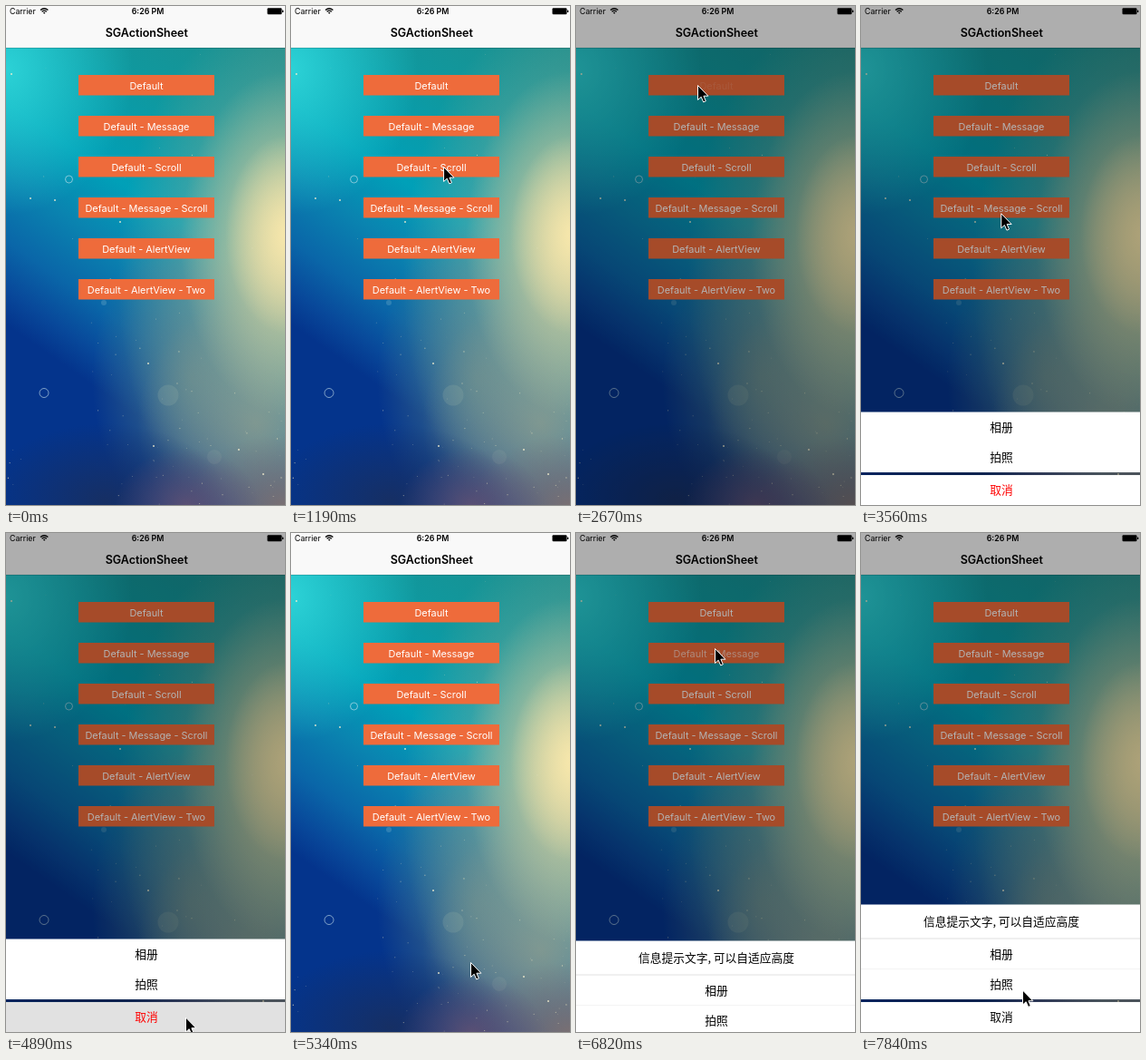
An HTML page for the animation above (7990 ms loop, 308 px wide and 550 px high).

```html
<!DOCTYPE html>
<html lang="zh-CN">
<head>
<meta charset="utf-8">
<style>
html, body { margin: 0; width: 100%; height: 100%; overflow: hidden; }
svg { display: block; }
text { font-family: Inter, "Noto Sans CJK SC", "Noto Sans CJK", sans-serif; text-anchor: middle; }
.bar { font-size: 8.8px; }
.title { font-size: 12.5px; font-weight: 600; }
.label { font-size: 10.9px; fill: #fff; }
.row { font: 12.75px "Noto Sans CJK SC", "Noto Sans CJK", sans-serif; }
</style>
</head>
<body>
<svg id="stage" width="308" height="550" viewBox="0 0 308 550">
  <g id="sky"></g>
  <path d="M0 0H308V46H0Z" fill="#f9f9f9"/>
  <path d="M0 46.3H308" stroke="#000" stroke-opacity=".3" stroke-width=".6"/>
  <text class="bar" x="4" y="9" style="text-anchor:start">Carrier</text>
  <g fill="none" stroke="#000" stroke-width="1.3">
    <path d="M38 4.6Q42.2 .9 46.4 4.6M39.6 6.3Q42.2 4 44.8 6.3"/>
    <path d="M40.9 7.3Q42.2 6.3 43.5 7.3L42.2 8.8Z" fill="#000" stroke="none"/>
  </g>
  <text class="bar" x="156.5" y="9.2" font-weight="600">6:26 PM</text>
  <rect x="288.5" y="2.3" width="16" height="7" rx="1.2"/>
  <rect x="305" y="4.5" width="1.3" height="2.6" rx=".5"/>
  <text class="title" x="155.3" y="34.2">SGActionSheet</text>
  <g id="buttons"></g>
  <path id="dim" d="M0 0H308V550H0Z" opacity="0"/>
  <g id="plain"></g>
  <g id="message"></g>
  <path id="cursor" d="M0 0V16L3.7 12.7L6.2 18.4L8.8 17.3L6.4 11.7H11.4Z" stroke="#fff" stroke-linejoin="round"/>
</svg>
<script>
const $ = id => document.getElementById(id);
const LOOP = 7990;

// Background: soft colour pools, [x, y, rx, ry, colour], topmost first
const pools = [
  [312, 252, 70, 110, '#f8e8ac'], [308, 262, 115, 190, '#d2cf9f'],
  [200, 552, 80, 65, '#5b5074'], [308, 552, 110, 80, '#7b7072'],
  [110, 545, 135, 85, '#162f64'], [308, 300, 185, 300, '#8fae9a'],
  [275, 460, 130, 140, '#72868a'], [205, 410, 110, 170, '#47788c'],
  [0, 70, 140, 160, '#2cd2d6']
];
$('stage').style.background = pools
  .map(([x, y, rx, ry, c]) => `radial-gradient(${rx}px ${ry}px at ${x}px ${y}px, ${c}, ${c}00)`)
  .concat('linear-gradient(215deg, #1f8c88, #10989e 25%, #00a0b8 42%, #0a84b0 52%, ' +
    '#0a66a8 62%, #08489a 69%, #04348c 74%)').join();

let seed = 7;
const random = () => (seed = seed * 16807 % 2147483647) / 2147483647;
const dot = (x, y, r, fill, opacity) =>
  `<circle cx="${x}" cy="${y}" r="${r}" fill="${fill}" opacity="${opacity}"/>`;
const bubble = (x, y, r) =>
  `<circle cx="${x}" cy="${y}" r="${r}" fill="none" stroke="#cfe6ee" stroke-opacity=".6"/>`;

let sky = '';
for (let i = 0; i < 90; i++) {
  const y = 50 + 500 * Math.sqrt(random());
  const x = (random() * 220 + y * .22) % 308;
  sky += dot(x, y, .3 + random() * .4, '#e8e4c0', .25 + random() * .5);
}
for (const [x, y] of [[6, 75], [130, 90], [27, 212], [54, 214], [126, 238], [257, 489], [284, 516], [163, 485], [157, 394]])
  sky += dot(x, y, 1, '#f4efd0', .85);
sky += dot(179, 429, 11.5, '#a0b8a8', .2) + dot(230, 497, 8, '#b0b8b0', .12) + dot(108, 327, 3, '#9cc8d8', .25);
sky += bubble(42, 426.5, 5) + bubble(69.5, 191, 4);
$('sky').innerHTML = sky;

const labels = ['Default', 'Default - Message', 'Default - Scroll',
  'Default - Message - Scroll', 'Default - AlertView', 'Default - AlertView - Two'];
$('buttons').innerHTML = labels.map((label, i) => {
  const y = 76 + i * 45;
  return `<rect x="80" y="${y}" width="150" height="22.5" fill="#ee6b3b"/>
    <text class="label" x="155" y="${y + 15.5}">${label}</text>`;
}).join('');
const captions = document.querySelectorAll('.label');

const row = (y, text, fill = '#000') => `<text class="row" x="155" y="${y + 4.7}" fill="${fill}">${text}</text>`;
const line = (y, color) => `<path d="M0 ${y}H308" stroke="${color}" stroke-width=".8"/>`;
const panel = (y, bottom) => `<path d="M0 ${y}H308V${bottom}H0Z" fill="#fff"/>`;
const choices = row(464, '相册') + row(497, '拍照');
$('plain').innerHTML = panel(447.5, 514) + choices +
  '<path id="cancel" d="M0 517H308V550H0Z"/>' + row(533, '取消', '#f00');
$('message').innerHTML = panel(409.5, 514) + panel(517, 550) + line(447, '#d8d8d8') + line(480.5, '#f0f0f0') +
  row(428, '信息提示文字, 可以自适应高度') + choices + row(533, '取消');

// The screen refreshes in steps: [ms, step]
const clock = [[0, 0], [1040, 7], [2230, 15], [2670, 18], [3260, 22], [4290, 29], [4890, 33],
  [5940, 40], [6970, 47], [7110, 48], [7840, 53], [LOOP, 54]];
function stepAt(ms) {
  const i = clock.findIndex(c => c[0] > ms);
  const [t0, s0] = clock[i - 1], [t1, s1] = clock[i];
  return Math.min(s1 - 1, Math.floor(s0 + (ms + 3 - t0) / (t1 - t0) * (s1 - s0)));
}

const smooth = u => u * u * (3 - 2 * u);
const easeOut = u => 1 - (1 - u) ** 2;
// Pointer path: [step, x, y, easing towards this point]
const path = [[7, 179, 205], [15, 134.5, 87.5, easeOut], [21, 134.5, 87.5, smooth], [29, 198.5, 534, smooth],
  [35, 198.5, 534, smooth], [36, 198.5, 473.5, smooth], [44, 153.5, 127.5, easeOut],
  [47, 153.5, 127.5, smooth], [53, 178.5, 504, smooth]];
function pointerAt(step) {
  const i = Math.max(1, path.findIndex(p => p[0] >= step));
  const [s0, x0, y0] = path[i - 1], [s1, x1, y1, ease] = path[i];
  const u = ease((step - s0) / (s1 - s0));
  return [x0 + (x1 - x0) * u, y0 + (y1 - y0) * u];
}

const hidden = [1, .284, 0]; // share of the sheet still below the edge
const fade = [.12, .6, 1];   // label recovering from a tap
const opening = (list, step, start) => list[Math.max(0, Math.min(2, step - start))];
const slide = (id, height, share) => $(id).setAttribute('transform', `translate(0 ${height * share})`);

function draw() {
  const step = stepAt(performance.now() % LOOP);
  const closing = step === 34;
  const dimmed = step >= 18 && step < 35 || step >= 45;
  $('dim').setAttribute('opacity', dimmed ? closing ? .12 : .3 : 0);
  slide('plain', 104, step >= 35 ? 1 : closing ? .6 : opening(hidden, step, 18));
  slide('message', 141, opening(hidden, step, 45));
  $('cancel').setAttribute('fill', step === 33 ? '#e1e1e1' : '#fff');
  captions[0].setAttribute('opacity', step < 18 ? 1 : opening(fade, step, 18));
  captions[1].setAttribute('opacity', step < 45 ? 1 : opening(fade, step, 45));
  $('cursor').setAttribute('visibility', step < 7 ? 'hidden' : 'visible');
  if (step >= 7) $('cursor').setAttribute('transform', `translate(${pointerAt(step)})`);
  requestAnimationFrame(draw);
}
draw();
</script>
</body>
</html>
```
